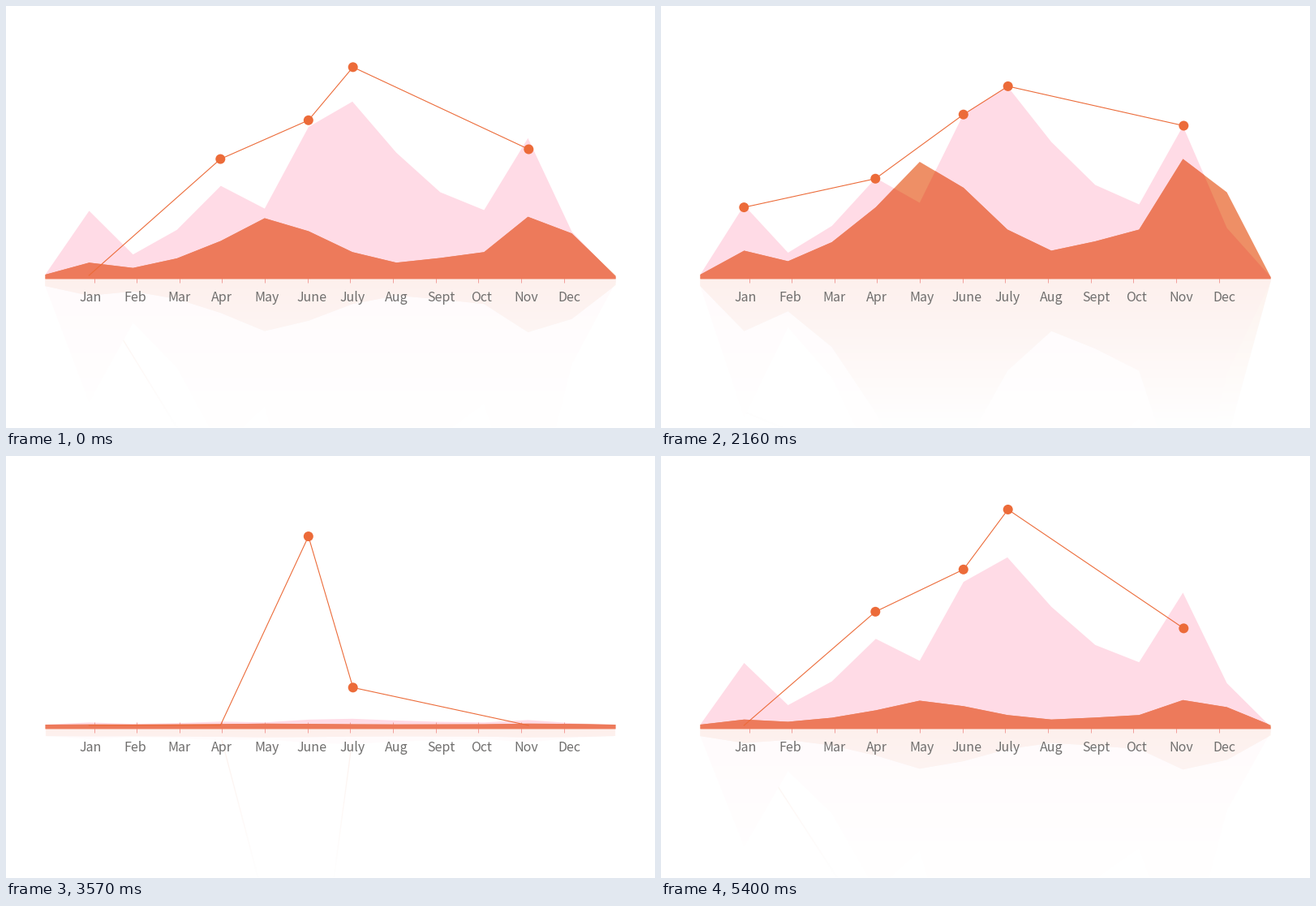
These frames come from a looping animation (800 by 520 pixels, 5430 ms). A matplotlib script:

```python
import numpy as np
import matplotlib.pyplot as plt
from matplotlib.animation import FuncAnimation
from matplotlib.patches import Polygon, Circle

W, H, DPI = 800, 520, 100
PX = 72 / DPI
SLOTS, SLOT_MS = 181, 30

TOP, FLOOR, LINE_REST = 331.0, 336.4, 332.0
MIRROR_TOP, MIRROR_SCALE = 345.0, 1.88

PINK, ORANGE, OVERLAP = "#ffdbe6", "#ee8f66", "#ed7a5b"
ACCENT, TICK, TEXT = "#ec6b39", "#f2a09c", "#706f6e"

MONTHS = ["Jan", "Feb", "Mar", "Apr", "May", "June",
          "July", "Aug", "Sept", "Oct", "Nov", "Dec"]
LABEL_X = [104.3, 158.7, 213.3, 265.7, 321.3, 376.5,
           427, 481, 536.3, 586, 641.2, 694.2]

AREA_X = np.linspace(48.4, 751.6, 14)
PINK_Y = np.array([331, 245.5, 304, 271, 212, 242.5, 133,
                   99, 167.5, 220.5, 244.5, 148, 273.5, 334])
ORANGE_Y = np.array([331, 301.5, 314.5, 291, 248, 192, 224,
                     275.5, 301.5, 290, 275.5, 188.5, 229.5, 334])

# Marker x, resting y, first step of its tween
MARKERS = [(102.3, 247.7, 4), (264.3, 212.7, -8), (372.8, 133.7, -18),
           (427.7, 98.9, -12), (644.3, 148.1, -4)]
LINE_START = min(m[2] for m in MARKERS)


def playhead(slot):
    """Timeline step: plays forward, reverses, then starts over."""
    step = slot - (slot + 5) // 6
    return 44 - abs(step - 44) if step < 120 else step - 151


def quint_in_out(t):
    t = min(max(t, 0.0), 1.0)
    return 16 * t**5 if t < 0.5 else 1 - 16 * (1 - t)**5


def elastic_out(t):
    if t <= 0:
        return 0.0
    if t >= 1:
        return 1.0
    return 1 - 2**(-10 * t) * np.cos(4 * np.pi * t)


def rise(x):
    """Growth of an area, x steps away from its midpoint."""
    if x == 0:
        return 0.5
    tail = 0.2925 * 2**(-0.463 * abs(x))
    return tail if x < 0 else 1 - tail


def mirror(y):
    return MIRROR_TOP + MIRROR_SCALE * (TOP - y)


def area_outline(final_y, u, widen_at, rise_at, mirrored=False):
    x = 400 + (AREA_X - 400) * quint_in_out((u - widen_at) / 20)
    y = TOP + (final_y - TOP) * rise(u - rise_at)
    if mirrored:
        y = mirror(y)
    xs = np.r_[x, x[-1], x[0]]
    ys = np.r_[y, FLOOR, FLOOR]
    return np.column_stack([xs, ys])


def marker_y(u):
    return np.array([LINE_REST + (y - LINE_REST) * elastic_out((u - start) / 40)
                     for _, y, start in MARKERS])


def tint(color, amount=0.11):
    rgb = np.array(plt.matplotlib.colors.to_rgb(color))
    return tuple(1 - (1 - rgb) * amount)


fig = plt.figure(figsize=(W / DPI, H / DPI), dpi=DPI, facecolor="white")
ax = fig.add_axes([0, 0, 1, 1])
ax.axis("off")


class Areas:
    """Pink and orange areas with a multiplied overlap."""

    def __init__(self, mirrored, z):
        self.mirrored = mirrored
        shade = tint if mirrored else (lambda c: c)

        def patch(color, dz):
            return ax.add_patch(Polygon([(0, 0), (1, 0), (0, 1)], lw=0,
                                        fc=shade(color), zorder=z + dz))
        self.pink = patch(PINK, 0)
        self.orange = patch(ORANGE, 0.3)
        self.overlap = patch(OVERLAP, 0.4)

    def update(self, u):
        pink = area_outline(PINK_Y, u, -31.5, -4, self.mirrored)
        orange = area_outline(ORANGE_Y, u, -28.5, 0, self.mirrored)
        self.pink.set_xy(pink)
        self.orange.set_xy(orange)
        self.overlap.set_xy(orange)
        self.overlap.set_clip_path(self.pink)


reflection = Areas(True, 1)
areas = Areas(False, 3)

fade = np.ones((184, 1, 4))
fade[:, 0, 3] = np.linspace(0, 1, 184)
ax.imshow(fade, extent=(0, W, H, 336), aspect="auto",
          interpolation="bilinear", zorder=2)

marker_x = [m[0] for m in MARKERS]
mirror_line, = ax.plot([], [], color=tint(ACCENT, 0.1), lw=1.2 * PX, zorder=0.9)
line, = ax.plot([], [], color=ACCENT, lw=1.1 * PX, zorder=5,
                solid_joinstyle="round")
dots = [ax.add_patch(Circle((x, LINE_REST), 6, fc=ACCENT, lw=0, zorder=6))
        for x in marker_x]
tick_x = 108.5 + 52.65 * np.arange(12)
ticks = ax.vlines(tick_x, 334, 335, colors=TICK, lw=1 * PX, zorder=3.2)

for x, month in zip(LABEL_X, MONTHS):
    ax.text(x, 364, month, ha="center", va="baseline", color=TEXT,
            family="Noto Sans CJK JP", fontsize=16 * PX, zorder=7)

ax.set_xlim(0, W)
ax.set_ylim(H, 0)


def draw(slot):
    u = playhead(slot)
    areas.update(u)
    reflection.update(u - 1)

    y = marker_y(u)
    line.set_data(marker_x, y)
    line.set_visible(u > LINE_START)
    mirror_line.set_data(marker_x, mirror(marker_y(u - 1)))
    mirror_line.set_visible(u - 1 > LINE_START)
    for dot, x, dot_y, (_, _, start) in zip(dots, marker_x, y, MARKERS):
        dot.center = (x, dot_y)
        dot.set_visible(u > start)

    half = 6.5 * quint_in_out((u + 30) / 20)
    ticks.set_segments([[(x, 334.5 - half), (x, 334.5 + half)] for x in tick_x])
    ticks.set_visible(half > 0.05)
    return []


anim = FuncAnimation(fig, draw, frames=SLOTS, interval=SLOT_MS,
                     init_func=lambda: draw(0), repeat=True, repeat_delay=0)
plt.show()
```
